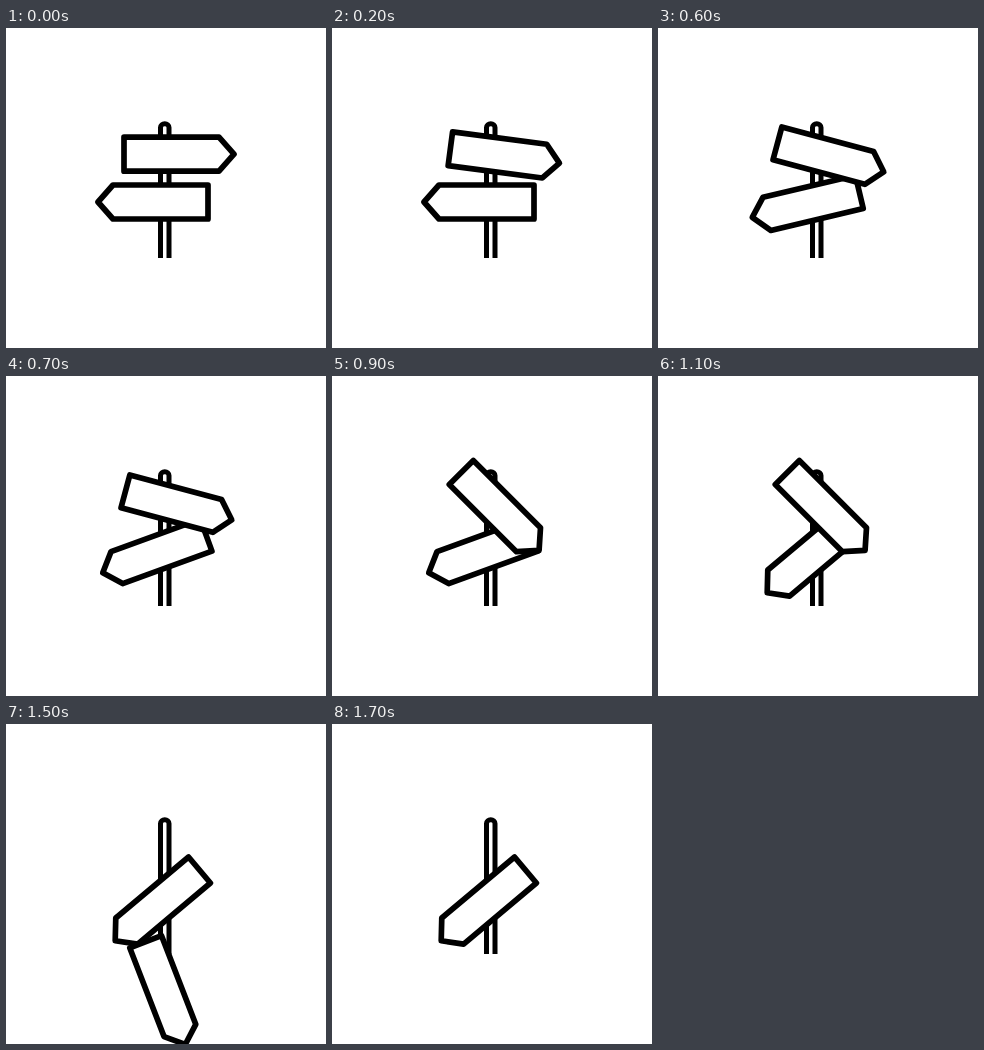
An HTML page that plays this animation: 320x320 px, repeating every 1.8 s.

```html
<!DOCTYPE html>
<html lang="en">
<head>
<meta charset="utf-8">
<title>Falling signpost</title>
<style>
  html, body { margin: 0; height: 100%; overflow: hidden; background: #fff; }
  svg { display: block; width: 100%; height: 100%; filter: blur(0.5px); }
  path { fill: #fff; stroke: #000; stroke-width: 5.7; stroke-linejoin: round; }
  #pole { stroke-width: 5; }
</style>
</head>
<body>
<svg viewBox="0 0 320 320">
  <defs><path id="board" d="M-42-17H53L68 0 53 17H-42Z"/></defs>
  <path id="pole" d="M154.5 230V99.5a4.2 3.7 0 0 1 8.5 0V230"/>
  <use id="lower" href="#board"/>
  <use id="upper" href="#board"/>
</svg>
<script>
const LOOP = 1800, STEP = 100;
const upper = document.getElementById('upper');
const lower = document.getElementById('lower');

const ramp = (n, from, to) => Math.min(1, Math.max(0, (n - from) / (to - from)));

function place(board, x, y, angle, flip = 1) {
  board.setAttribute('transform', `translate(${x} ${y}) rotate(${angle}) scale(${flip} 1)`);
}

function draw(now) {
  // The motion advances in hard steps
  const n = Math.floor((now % LOOP) / STEP);

  // Upper board: sags, slips, then comes loose and falls
  const tilt = ramp(n, 7, 9);
  const slip = ramp(n, 11, 12);
  const fall = Math.max(0, n - 12);
  const spin = Math.max(0, n - 13);
  const upperAngle = 15 * ramp(n, 0, 4) + 30 * tilt + 19.5 * slip + 2.2 * spin;
  place(upper, 160 - tilt - 3 * slip - 0.6 * spin, 126.2 + 10.9 * fall * (fall + 1), upperAngle);

  // Lower board: sags in two moves and stays
  const sag = ramp(n, 4, 7) + ramp(n, 9, 11);
  place(lower, 160 + 0.65 * sag, 174 - 0.5 * sag, -20 * sag, -1);

  requestAnimationFrame(() => draw(performance.now() - start));
}

const start = performance.now();
draw(0);
</script>
</body>
</html>
```
